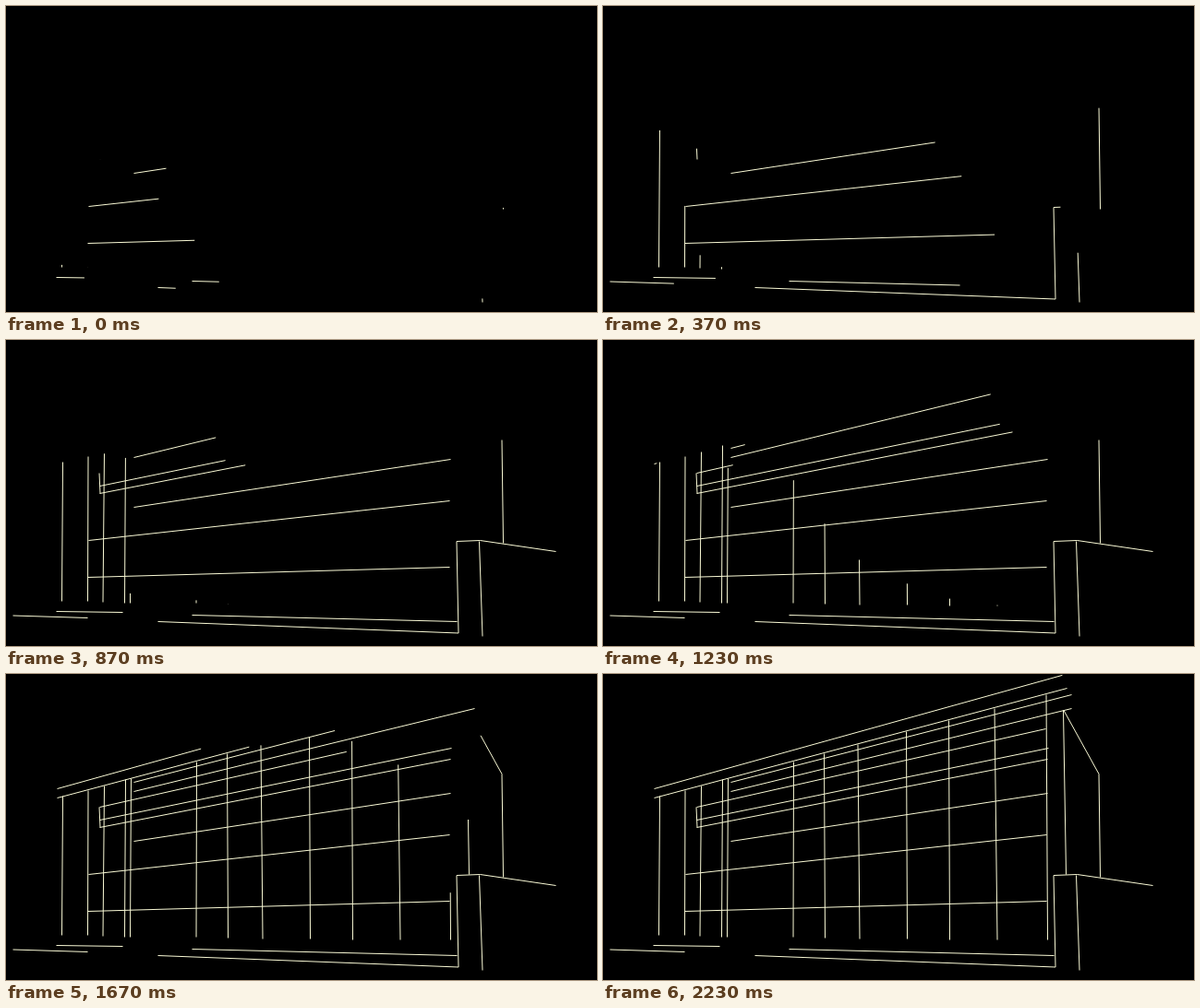
An HTML page for the animation above (2.26 s loop, 640 by 332 pixels).

```html
<!DOCTYPE html>
<html>
<head>
<meta charset="utf-8">
<style>
  html, body { margin: 0; width: 100%; height: 100%; overflow: hidden; background: #000; }
  svg { display: block; fill: none; stroke: #fafad6; stroke-width: 1; }
</style>
</head>
<body>
<!-- The half-pixel shift puts whole coordinates on pixel centres. -->
<svg id="stage" width="640" height="332" viewBox="-0.5 -0.5 640 332"></svg>
<script>
const LOOP = 2260;
const sine = u => (1 - Math.cos(Math.PI * u)) / 2;
const cubic = u => u < 0.5 ? 4 * u ** 3 : 1 - 4 * (1 - u) ** 3;

// Each stroke: start time in ms, then the points in drawing order.
const groups = [
  { ease: sine, duration: 957, strokes: [
    [-430, "54,294 126,295"],
    [-349, "88,257 480,246"],
    [-277, "89,217 480,174"],
    [-197, "138,181 481,129"],
    [-197, "201,298 488,305"],
    [-121, "515.5,321 512,218"],
  ]},
  { ease: sine, duration: 1030, strokes: [
    [412, "101,166 481,92"],
    [451, "101,158 482,80"],
    [535, "138,127 507,37"],
    [1016, "101,144 479,59"],
    [1097, "138,117 507,22"],
    [1179, "55,134 502,15"],
    [1256, "55,124 500,0"],
  ]},
  { ease: cubic, duration: 545, strokes: [
    [-88, "60,283 61,132"],
    [-82, "538,220 536.5,108"],
    [6, "7,298.5 88,301"],
    [1378, "536.5,108 498.5,39"],
  ]},
  { ease: cubic, duration: 860, strokes: [
    [-178, "164,305 489.5,317.5 487.5,218 513,217 595,229"],
    [-70, "101.5,166 100.5,144"],
    [-36, "88,283 88.5,126"],
    [131, "104.5,284 106,121"],
    [243, "128,285 129,114"],
    [657, "134,285 135,113"],
    [733, "205.5,285 206,95"],
    [820, "240,286 239,86"],
    [898, "277.5,287 275.5,76"],
    [977, "329,287 328,62"],
    [1057, "375,288 374,50"],
    [1149, "426.5,288 423.5,37"],
    [1295, "501,217 498,39"],
    [1358, "481,288 479.5,22"],
  ]},
];

function makeLine(points) {
  const line = document.createElementNS("http://www.w3.org/2000/svg", "polyline");
  line.setAttribute("points", points);
  line.setAttribute("pathLength", 1);
  return stage.appendChild(line);
}

const lines = groups.flatMap(({ ease, duration, strokes }) =>
  strokes.map(([start, points]) => ({ ease, duration, start, node: makeLine(points) })));

function draw() {
  const t = performance.now() % LOOP;
  for (const { ease, duration, start, node } of lines) {
    const u = Math.min(1, Math.max(0, (t - start) / duration));
    node.style.display = u > 0 ? "" : "none";
    node.style.strokeDasharray = u < 1 ? `${ease(u)} 2` : "none";
  }
  requestAnimationFrame(draw);
}
draw();
</script>
</body>
</html>
```
